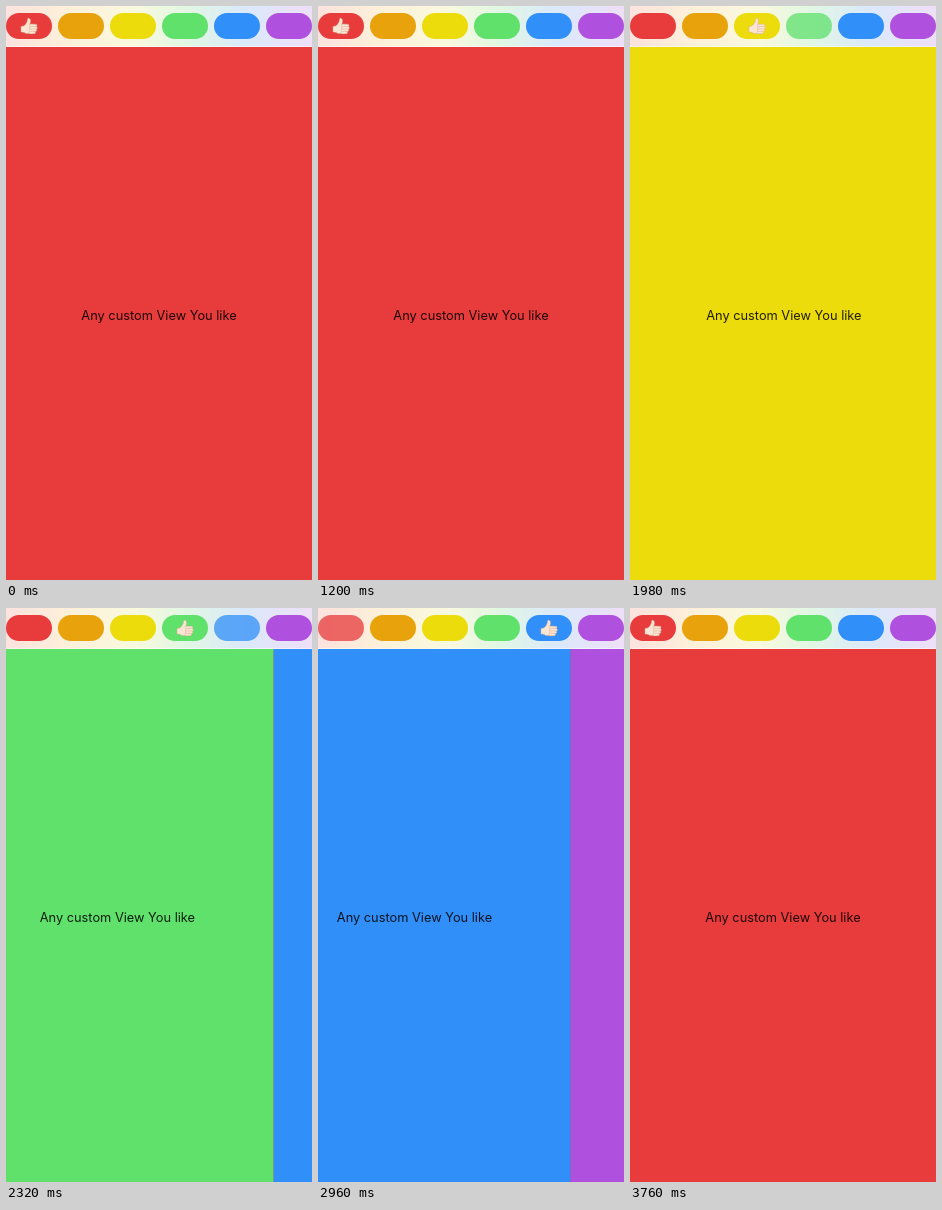
An HTML page for the animation above (3.78 s loop, 306 px wide and 574 px high).

```html
<!DOCTYPE html>
<html lang="en">
<head>
<meta charset="utf-8">
<title>Tab pager</title>
<style>
  html, body { margin: 0; width: 100%; height: 100%; overflow: hidden; }
  #stage { position: relative; width: 306px; height: 574px; overflow: hidden; background: #e73b3c; }
  #pages { position: absolute; top: 41px; left: -2.5px; height: 533px; }
  .page {
    position: absolute; top: 0; width: 311px; height: 533px;
    font: 12.8px/537px Inter, Roboto, sans-serif;
    text-align: center; white-space: nowrap; color: rgba(0, 0, 0, .87);
  }
  #bar {
    position: absolute; top: 0; left: 0; width: 306px; height: 41px;
    background: linear-gradient(90deg, #fce2de, #fdf0d9 20%, #f9f9de 42%, #e1f7e3 59%, #dbe9fb 78%, #eedff8);
    box-shadow: inset 0 -1px rgba(255, 255, 255, .5);
  }
  .tab { position: absolute; top: 7px; width: 46px; height: 26px; border-radius: 13px; }
  #thumb { position: absolute; top: 11px; left: 14px; width: 18px; height: 18px; }
</style>
</head>
<body>
<div id="stage">
  <div id="pages"></div>
  <div id="bar">
    <svg id="thumb" viewBox="0 0 18 18" fill="#fbe6d5" stroke="#d8ae93" stroke-width=".5">
      <path d="M1 9.5 Q4 9.5 5.5 7.5 Q7.6 4.8 7.6 2.4 Q7.8 .8 9 1.2 Q11 2 10.4 5 L9.8 7.6 H13 V16.6 H7.5 Q5 16.6 4 15.3 L1 15 Z"/>
      <rect x="9.3" y="7.2" width="7.6" height="2.7" rx="1.3"/>
      <rect x="9.5" y="9.6" width="7.8" height="2.7" rx="1.3"/>
      <rect x="9.3" y="12" width="7.3" height="2.6" rx="1.3"/>
      <rect x="9" y="14.3" width="6.4" height="2.4" rx="1.2"/>
    </svg>
  </div>
</div>
<script>
const LOOP = 3780, PAGE = 311, PITCH = 52, SETTLE = 36;
const colors = ['#e73b3c', '#e8a20b', '#eddc0b', '#5fe16c', '#308ff8', '#af50de'];
// Each tap: release time in ms, tab index
const taps = [[1382, 1], [1690, 2], [1990, 3], [2298, 4], [2597, 5], [2935, 0]];

const pages = document.getElementById('pages');
const bar = document.getElementById('bar');
const thumb = document.getElementById('thumb');

function add(parent, className, left, color) {
  const el = document.createElement('div');
  el.className = className;
  el.style.left = left + 'px';
  el.style.background = color;
  parent.prepend(el);
  return el;
}

const tabs = colors.map((color, i) => {
  add(pages, 'page', i * PAGE, color).textContent = 'Any custom View You like';
  return add(bar, 'tab', i * PITCH, color);
});

const clamp = x => Math.min(1, Math.max(0, x));

// Critically damped spring from 0 to 1
function spring(ms) {
  const x = Math.max(0, ms) / SETTLE;
  return 1 - (1 + x) * Math.exp(-x);
}

function position(t) {
  let p = 0, from = 0;
  for (const [start, to] of taps) {
    p += (to - from) * spring(t - start);
    from = to;
  }
  return p;
}

function draw(now) {
  const t = now % LOOP;
  const p = position(t);
  pages.style.transform = `translateX(${-p * PAGE}px)`;

  // The thumb stays on its tab until the next page is nearly halfway in
  const tab = Math.floor(p);
  const x = tab + clamp((p - tab - .4) / .55);
  thumb.style.transform = `translateX(${x * PITCH}px)`;

  for (const [start, i] of taps) {
    const dt = t - start;
    const lit = dt < -100 ? 0 : clamp((90 - dt) / 50);
    tabs[i].style.opacity = 1 - .25 * lit;
  }
  requestAnimationFrame(draw);
}
requestAnimationFrame(draw);
</script>
</body>
</html>
```
